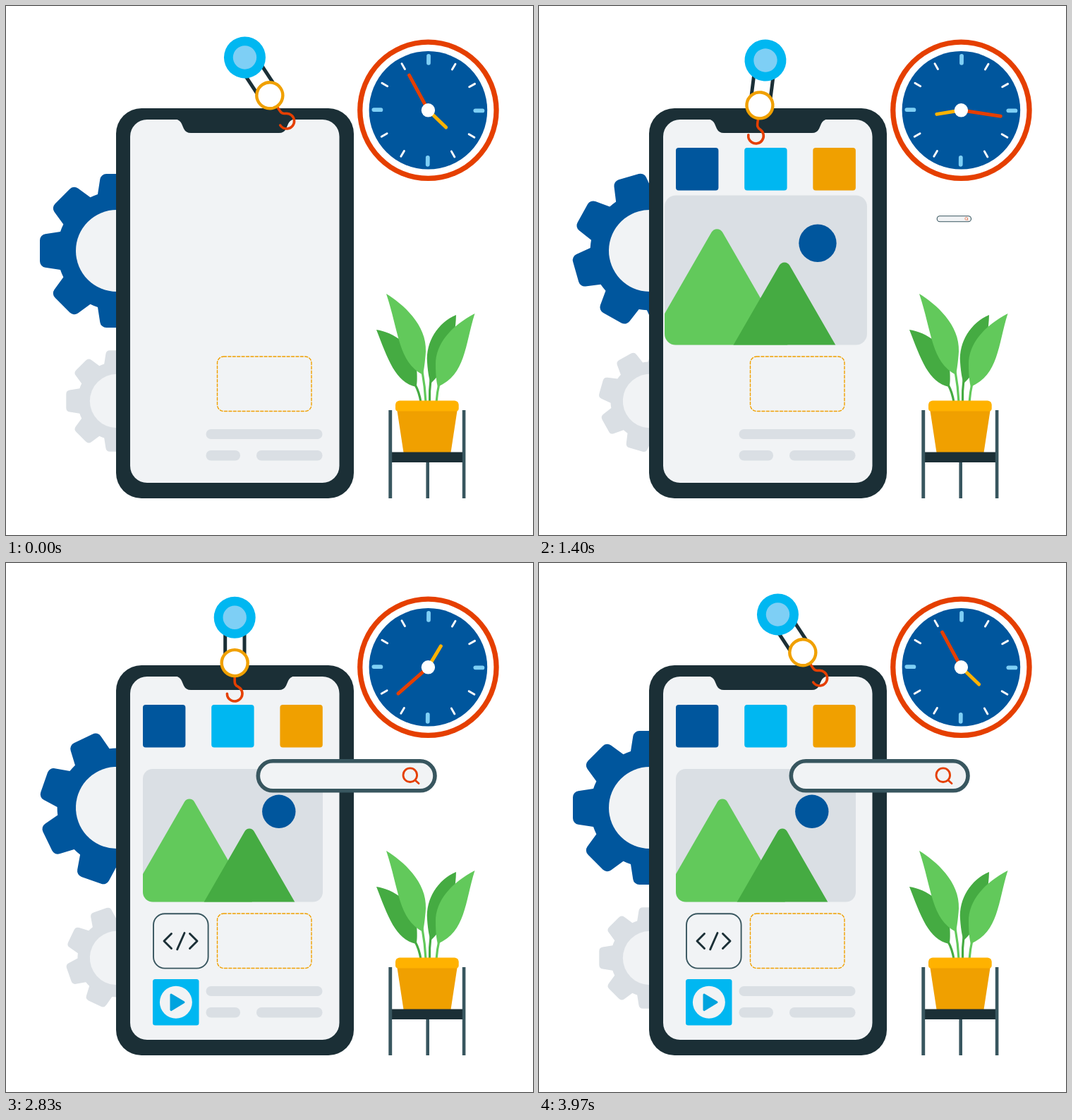
An HTML page with a canvas that plays this animation: 747 px wide and 750 px high, repeating every 4010 ms.

```html
<!DOCTYPE html>
<html lang="en">
<head>
<meta charset="utf-8">
<title>App builder</title>
<style>
html, body { margin: 0; width: 100%; height: 100%; overflow: hidden; background: #fff; }
canvas { display: block; width: 747px; height: 750px; }
</style>
</head>
<body>
<canvas id="stage" width="747" height="750"></canvas>
<script>
const ctx = document.getElementById('stage').getContext('2d');
const LOOP = 4010, LAST = 119, TAU = Math.PI * 2, DEG = Math.PI / 180;
const C = {
  ink: '#1b2f36', slate: '#38565f', paper: '#f1f3f5', grey: '#dadfe4',
  blue: '#00569d', cyan: '#00b7f1', sky: '#7ecff5', play: '#00a3de',
  red: '#e53f00', orange: '#f0a000', amber: '#ffb200',
  leaf: '#62c95b', fern: '#45ab42', white: '#fff'
};

// Start tick of each pop-in
const START = { blue: 0.5, cyan: 9.8, orange: 20.9, photo: 28.9, search: 39.4, code: 48.7, play: 58.2 };
const RISE = 10, SETTLE = 12, PEAK = 1.15;

const smooth = u => u * u * (3 - 2 * u);
const clamp = u => Math.max(0, Math.min(1, u));

function popScale(tick, start) {
  const t = tick - start;
  if (t < RISE) return PEAK * smooth(clamp(t / RISE));
  return PEAK + (1 - PEAK) * smooth(clamp((t - RISE) / SETTLE));
}

function fill(color) { ctx.fillStyle = color; ctx.fill(); }

function stroke(color, width) {
  ctx.strokeStyle = color;
  ctx.lineWidth = width;
  ctx.stroke();
}

function box(x1, y1, x2, y2, r) {
  ctx.beginPath();
  ctx.roundRect(x1, y1, x2 - x1, y2 - y1, r);
}

function block(x1, y1, x2, y2, r, color) { box(x1, y1, x2, y2, r); fill(color); }

function disc(x, y, r, color) {
  ctx.beginPath();
  ctx.arc(x, y, r, 0, TAU);
  fill(color);
}

function line(color, width, ...p) {
  ctx.beginPath();
  for (let i = 0; i < p.length; i += 2) ctx.lineTo(p[i], p[i + 1]);
  stroke(color, width);
}

function shape(d, color) { ctx.fillStyle = color; ctx.fill(new Path2D(d)); }

function at(x, y, angle, scale, draw) {
  if (scale <= 0) return;
  ctx.save();
  ctx.translate(x, y);
  ctx.rotate(angle);
  ctx.scale(scale, scale);
  draw();
  ctx.restore();
}

// Draw in stage coordinates, scaled about an anchor
function pop(tick, name, x, y, draw) {
  at(x, y, 0, popScale(tick, START[name]), () => {
    ctx.translate(-x, -y);
    draw();
  });
}

function gear(x, y, scale, angle, color) {
  at(x, y, angle, scale, () => {
    ctx.beginPath();
    for (let i = 0; i < 8; i++) {
      const a = i * TAU / 8, c = Math.cos(a), s = Math.sin(a);
      const pt = (u, v) => [u * c - v * s, u * s + v * c];
      ctx.lineTo(...pt(80, -27));
      ctx.arcTo(...pt(109, -22.5), ...pt(109, 0), 9);
      ctx.arcTo(...pt(109, 22.5), ...pt(80, 27), 9);
      ctx.lineTo(...pt(80, 27));
      const half = Math.atan2(27, 80);
      ctx.arc(0, 0, 84.4, a + half, a + TAU / 8 - half);
    }
    ctx.closePath();
    fill(color);
    disc(0, 0, 58, C.paper);
  });
}

function phone() {
  block(156, 145, 493, 698, 36, C.ink);
  block(176, 161, 472.5, 676, 24, C.paper);
  shape('M240 160 Q247 162 249 167 L252 174 Q255 180 262 180 H387 Q394 180 397 174 L400 167 Q402 162 409 160 Z', C.ink);
  ctx.setLineDash([4, 2.4]);
  box(299.5, 497, 433, 574.5, 9);
  stroke(C.orange, 1.4);
  ctx.setLineDash([]);
  block(283.5, 600, 448.5, 614, 7, C.grey);
  block(283.5, 630, 332, 644.5, 7, C.grey);
  block(355, 630, 448.5, 644.5, 7, C.grey);
}

function tile(tick, name, cx) {
  pop(tick, name, cx, 231.2, () => block(cx - 30.2, 201, cx + 30.2, 261.4, 4, C[name]));
}

function hill(x, top, r, color) {
  const half = (481 - top) / 1.735;
  ctx.beginPath();
  ctx.moveTo(x - half, 481);
  ctx.arcTo(x, top, x + half, 481, r);
  ctx.lineTo(x + half, 481);
  fill(color);
}

function photo() {
  box(194, 292, 449, 480.6, 14);
  fill(C.grey);
  ctx.save();
  ctx.clip();
  hill(260, 326.5, 8, C.leaf);
  hill(345, 369, 7.5, C.fern);
  ctx.restore();
  disc(386.8, 352.3, 23.7, C.blue);
}

function search() {
  box(357.3, 280.8, 608, 322.8, 21);
  fill(C.paper);
  stroke(C.slate, 5.6);
  ctx.beginPath();
  ctx.arc(572.8, 300.7, 9.8, 0, TAU);
  stroke(C.red, 2.8);
  line(C.red, 2.8, 580, 308, 585, 312.5);
}

function code() {
  box(209, 497.2, 286.6, 574.6, 16);
  fill(C.paper);
  stroke(C.slate, 1.9);
  line(C.ink, 2.9, 234.5, 525.5, 224, 536, 234.5, 546.5);
  line(C.ink, 2.9, 253, 524.5, 242.7, 547.8);
  line(C.ink, 2.9, 260.5, 525.5, 271, 536, 260.5, 546.5);
}

function player() {
  block(208, 590, 273.5, 655.5, 3.5, C.cyan);
  disc(240.9, 622.8, 23, C.paper);
  ctx.beginPath();
  ctx.moveTo(234, 612);
  ctx.lineTo(252, 622.8);
  ctx.lineTo(234, 633.6);
  ctx.closePath();
  fill(C.play);
  stroke(C.play, 3);
}

function hand(angle, length, color) {
  const a = angle * DEG;
  line(color, 5, 0, 0, Math.sin(a) * length, -Math.cos(a) * length);
}

function clock(turn) {
  at(598.4, 147.8, 0, 1, () => {
    disc(0, 0, 100.3, C.red);
    disc(0, 0, 93, C.white);
    disc(0, 0, 83.8, C.blue);
    for (let i = 0; i < 12; i++) {
      at(0, 0, (i * 30 + 0.5) * DEG, 1, () => {
        if (i % 3) line(C.white, 2.9, 0, -67, 0, -76);
        else line(C.sky, 5.8, 0, -67, 0, -77);
      });
    }
    hand(133.8 + turn, 35, C.amber);
    hand(331.6 + turn, 56.5, C.red);
    disc(0, 0, 9.7, C.white);
  });
}

function plant() {
  const stem = (d, color) => { ctx.strokeStyle = color; ctx.lineWidth = 3.2; ctx.stroke(new Path2D(d)); };
  stem('M580 537 Q586 548 588 562', C.fern);
  stem('M602 530 Q600 545 600.5 562', C.fern);
  shape('M525 459 C548 462 580 482 582 512 C583 525 583 535 581.5 540 C552 534 541 500 525 459Z', C.fern);
  shape('M638 438 C612 449 595 476 597 505 C598 520 600 530 602 535 C622 518 637 480 638 438Z', C.fern);
  stem('M590 518 Q594 540 595 562', C.leaf);
  stem('M614 535 Q611 548 610 562', C.leaf);
  shape('M539 408 C562 422 597 452 595 490 C594 505 592.5 515 591 523 C556 505 557 462 539 408Z', C.leaf);
  shape('M664.5 436 C632 453 609 478 609 508 C609 522 610 533 612 540 C652 522 650 482 664.5 436Z', C.leaf);
  shape('M554.5 574 H639.5 L630.5 633 H563.5Z', C.orange);
  block(552, 559.5, 641.7, 574.5, [6, 6, 4, 4], C.amber);
  block(546, 632.5, 648, 647, 0, C.ink);
  block(542.3, 573, 547.2, 698, 0, C.slate);
  block(646.8, 573, 651.4, 698, 0, C.slate);
  block(595.4, 647, 600, 698, 0, C.slate);
}

function crane(swing) {
  at(324.2, 51.2, -swing * DEG, 1, () => {
    ctx.lineCap = 'butt';
    line(C.ink, 5, -13.5, 26, -13.5, 78);
    line(C.ink, 5, 13.8, 26, 13.8, 78);
    ctx.lineCap = 'round';
    disc(0, 26, 29.5, C.cyan);
    disc(0, 26, 16.7, C.sky);
    ctx.beginPath();
    ctx.moveTo(0, 110);
    ctx.lineTo(0, 117);
    ctx.quadraticCurveTo(0, 122, 4.5, 124);
    ctx.arc(0, 134, 10.8, -62 * DEG, Math.PI);
    stroke(C.red, 3.6);
    ctx.beginPath();
    ctx.arc(0, 90.4, 18.5, 0, TAU);
    fill(C.white);
    stroke(C.orange, 4.4);
  });
}

function swingAt(tick) {
  const low = -24.5, high = 33.3, mid = 60;
  const u = tick < mid ? 1 - tick / mid : (tick - mid) / (LAST - mid);
  return low + (high - low) * u;
}

function draw(tick) {
  ctx.fillStyle = C.white;
  ctx.fillRect(0, 0, 747, 750);
  ctx.lineCap = ctx.lineJoin = 'round';
  const turn = tick / LAST;

  gear(157, 347, 1, turn * 2 * TAU, C.blue);
  gear(157, 560, 0.658, -turn * 2 * TAU, C.grey);
  phone();
  tile(tick, 'blue', 224.2);
  tile(tick, 'cyan', 321.4);
  tile(tick, 'orange', 418.6);
  pop(tick, 'photo', 321.4, 480.6, photo);
  pop(tick, 'search', 613.6, 301.7, search);
  pop(tick, 'code', 247.8, 535.9, code);
  pop(tick, 'play', 240.8, 622.7, player);
  clock(turn * 360);
  plant();
  crane(swingAt(tick));
}

// 30 ticks per second, on a 10 ms grid
function tickAt(ms) {
  return Math.min(LAST, Math.floor((Math.floor(ms / 10) + 0.5) * 0.3));
}

const begin = performance.now();
function loop() {
  draw(tickAt((performance.now() - begin) % LOOP));
  requestAnimationFrame(loop);
}
loop();
</script>
</body>
</html>
```
